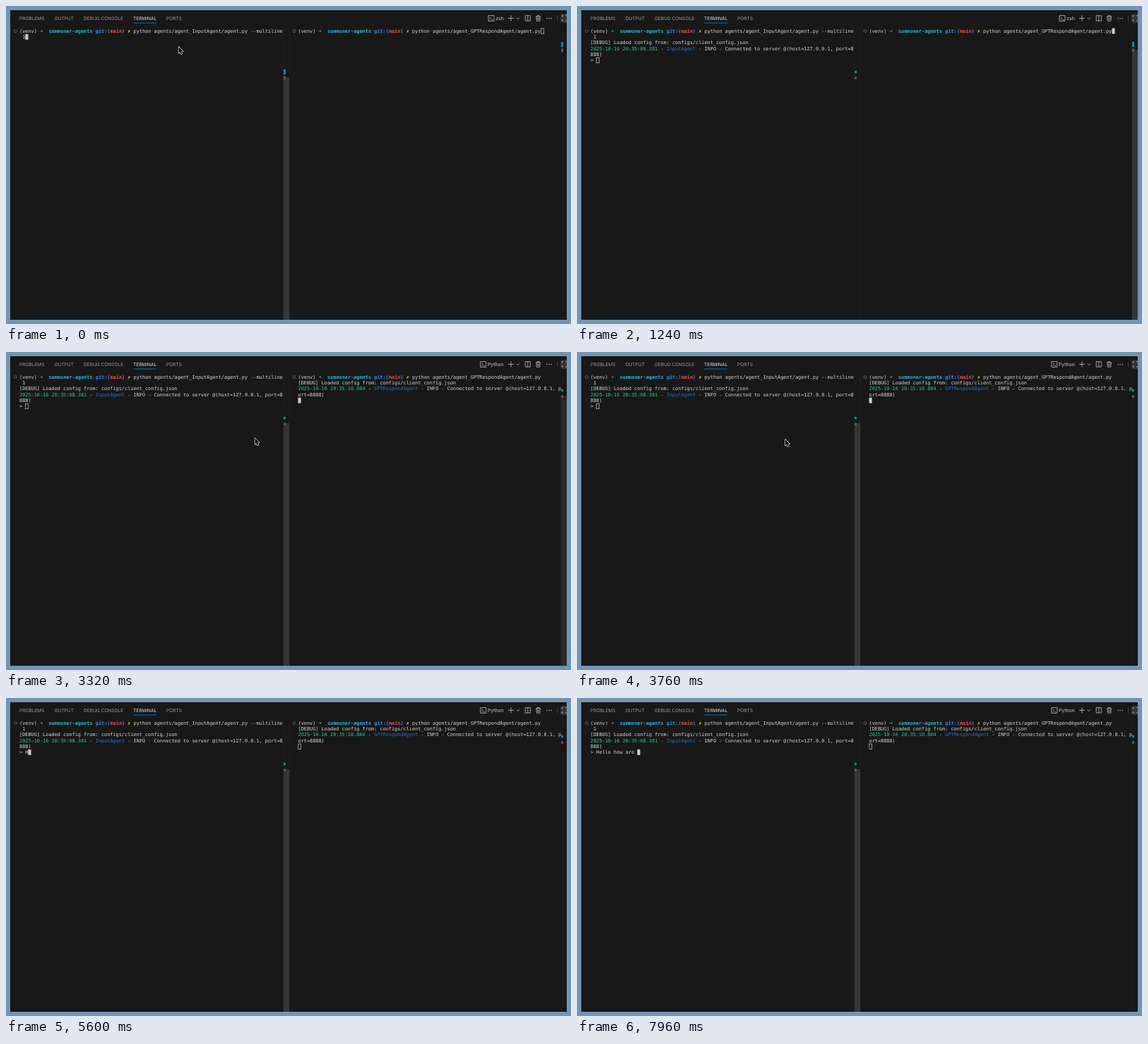
An HTML page with a canvas for the animation above (8000 ms loop, 800 by 451 pixels).

```html
<!DOCTYPE html>
<html lang="en">
<head>
<meta charset="utf-8">
<title>Terminal</title>
<style>
html, body { margin: 0; width: 100%; height: 100%; overflow: hidden; background: #7295b4; }
canvas { display: block; }
</style>
</head>
<body>
<canvas id="stage" width="800" height="451"></canvas>
<script>
const ctx = document.getElementById('stage').getContext('2d');
const LOOP = 8000, SIZE = 6.88, CELL = 4.144, ROW = 8.28, TOP = 31.4;
const MONO = `${SIZE}px "DejaVu Sans Mono", monospace`;
const SANS = 'Inter, sans-serif';
const WHITE = '#d6d6d6', GREEN = '#23d18b', CYAN = '#29b8db', BLUE = '#3b8eea', AGENT = '#2472c8';

// Moments of the session, in ms
const LEFT_RUN = 120, LEFT_LOG = 480, RIGHT_FOCUS = 880, RIGHT_RUN = 1520, RIGHT_LOG = 2880, LEFT_FOCUS = 4280;
const MESSAGE = 'Hello how are ';
const KEY_TIMES = [5500, 5640, 5800, 5960, 6120, 6280, 6600, 6720, 6840, 6960, 7160, 7320, 7480, 7640];

// Each path: shown from, shown until, then points [time, x, y]
const POINTER_PATHS = [
  [0, 1080, [[160, 244.5, 57.5], [860, 560, 98]]],
  [2920, 5480, [[2920, 560, 98], [3480, 302, 127.5], [3760, 295, 123.5], [4280, 110.5, 86]]],
];

const clamp = v => Math.max(0, Math.min(1, v));
const ramp = (t, start, length) => clamp((t - start) / length);
const smooth = v => v * v * (3 - 2 * v);

function rect(x, y, w, h, color) {
  ctx.fillStyle = color;
  ctx.fillRect(x, y, w, h);
}

function stroke(path, color = '#cccccc', width = 0.75) {
  ctx.strokeStyle = color;
  ctx.lineWidth = width;
  ctx.stroke(new Path2D(path));
}

function label(text, x, color, size, align = 'left') {
  ctx.font = `${size}px ${SANS}`;
  ctx.textAlign = align;
  ctx.fillStyle = color;
  ctx.fillText(text, x, 20);
  ctx.textAlign = 'left';
}

function write(x, col, row, text, color = WHITE, bold = false) {
  ctx.font = (bold ? 'bold ' : '') + MONO;
  ctx.fillStyle = color;
  ctx.fillText(text, x + col * CELL, TOP + row * ROW + 6.4);
}

function cursor(x, col, row, focused) {
  const left = x + col * CELL, top = TOP + row * ROW;
  if (focused) return rect(left, top + 0.2, CELL, ROW - 0.4, '#cccccc');
  ctx.strokeStyle = '#cccccc';
  ctx.lineWidth = 0.7;
  ctx.strokeRect(left + 0.35, top + 0.5, CELL - 0.5, ROW - 0.9);
}

function prompt(x, command) {
  ctx.beginPath();
  ctx.arc(x - 5.5, 35.6, 1.9, 0, 7);
  ctx.strokeStyle = '#777777';
  ctx.lineWidth = 0.7;
  ctx.stroke();
  write(x, 0, 0, '(venv)');
  write(x, 7, 0, '➜', GREEN, true);
  write(x, 10, 0, 'summoner-agents', CYAN, true);
  write(x, 26, 0, 'git:(', BLUE, true);
  write(x, 31, 0, 'main', '#f14c4c', true);
  write(x, 35, 0, ')', BLUE, true);
  write(x, 37, 0, '✗', '#f5f543', true);
  write(x, 39, 0, command);
}

function log(x, row, time, agent, tail, wrapped) {
  write(x, 0, row, '[DEBUG] Loaded config from: configs/client_config.json');
  write(x, 0, row + 1, '2025-10-16 ' + time, GREEN);
  write(x, 24, row + 1, '-');
  write(x, 26, row + 1, agent, AGENT);
  write(x, 27 + agent.length, row + 1, '- INFO - Connected to server @(host=127.0.0.1, ' + tail);
  write(x, 0, row + 2, wrapped);
}

function scrollbar(x, y, alpha) {
  ctx.globalAlpha = alpha;
  rect(x, y, 8, 445 - y, '#363636');
  ctx.globalAlpha = 1;
}

function marks(x, y, running) {
  const h = running ? 3.4 : 7.4;
  rect(x, y - h / 2, 3, h, '#1b81a8');
  rect(x, y + 7.6 - h / 4, 3, running ? 3.4 : 5, '#5a5a5a');
}

function header(shell) {
  const tabs = [['PROBLEMS', 19], ['OUTPUT', 68.5], ['DEBUG CONSOLE', 110], ['TERMINAL', 180], ['PORTS', 227]];
  for (const [name, x] of tabs) label(name, x, name === 'TERMINAL' ? '#e0e0e0' : '#9d9d9d', 6.55);
  rect(180, 23.6, 33, 0.9, '#0078d4');

  label(shell, 704.8, '#cccccc', 6.9, 'right');
  const x = shell === 'zsh' ? 683 : 671.8;
  stroke(`M${x} 13.6h8v7.8h-8zM${x + 1.6} 15.6l2 1.9l-2 1.9M${x + 4} 19.6h2.4`);
  stroke('M711 17.4h8M715 13.4v8M722.8 16.5l2.1 2.1l2.1-2.1');
  stroke('M735.2 13.7h7.2v7.4h-7.2zM738.8 13.7v7.4');
  stroke('M750 15h7.2M752.2 15v-1.4h2.8v1.4M750.9 15l.4 6.2h4.6l.4-6.2M752.7 16.6v3.2M754.5 16.6v3.2');
  for (const dot of [765.6, 768.6, 771.6]) rect(dot, 16.9, 1.2, 1.2, '#cccccc');
  rect(780.3, 13.5, 0.7, 8, '#555555');
  ctx.fillStyle = '#343536';
  ctx.beginPath();
  ctx.roundRect(785, 11, 14, 13, 3);
  ctx.fill();
  stroke('M789 13.7h-1.6v2M787.4 19v2h1.6M792 13.7h2M792 21h2');
}

function pointer(t) {
  const path = POINTER_PATHS.find(([from, until]) => t >= from && t < until);
  if (!path) return;
  const points = path[2];
  let [, x, y] = points[0];
  for (let i = 1; i < points.length; i++) {
    const [t0, x0, y0] = points[i - 1], [t1, x1, y1] = points[i];
    if (t < t0) break;
    const k = smooth(ramp(t, t0, t1 - t0));
    x = x0 + (x1 - x0) * k;
    y = y0 + (y1 - y0) * k;
  }
  const arrow = new Path2D('M0 0V8.9L2 7.1L3.4 10.3L4.9 9.6L3.5 6.5H6.2Z');
  ctx.save();
  ctx.translate(x, y + 0.4);
  ctx.lineJoin = 'round';
  ctx.strokeStyle = '#ffffff';
  ctx.lineWidth = 1.3;
  ctx.stroke(arrow);
  ctx.fillStyle = '#000000';
  ctx.fill(arrow);
  ctx.restore();
}

function leftPane(t, focused) {
  const x = 19;
  prompt(x, 'python agents/agent_InputAgent/agent.py --multiline');
  write(x, 1, 1, '1');
  if (t < LEFT_RUN) return cursor(x, 2, 1, focused);
  if (t < LEFT_LOG) return cursor(x, 0, 2, focused);
  log(x, 2, '20:35:08.381', 'InputAgent', 'port=8', '888)');
  const typed = KEY_TIMES.filter(time => t >= time).length;
  write(x, 0, 5, '> ' + MESSAGE.slice(0, typed));
  cursor(x, 2 + typed, 5, focused);
}

function rightPane(t, focused) {
  const x = 413.5;
  prompt(x, 'python agents/agent_GPTRespondAgent/agent.py');
  if (t < RIGHT_RUN) return cursor(x, 83, 0, focused);
  if (t < RIGHT_LOG) return cursor(x, 0, 1, focused);
  log(x, 1, '20:35:10.804', 'GPTRespondAgent', 'p', 'ort=8888)');
  cursor(x, 0, 4, focused);
}

function draw(t) {
  ctx.textRendering = 'geometricPrecision';
  rect(0, 0, 800, 451, '#7295b4');
  ctx.save();
  ctx.beginPath();
  ctx.rect(6, 6, 788, 439);
  ctx.clip();
  rect(6, 6, 788, 439, '#181818');
  for (const x of [392.6, 400.8, 785.8]) rect(x, 30, 0.6, 415, '#242424');

  const rightFocused = t >= RIGHT_FOCUS && t < LEFT_FOCUS;
  const running = rightFocused ? t >= RIGHT_RUN : t >= LEFT_RUN;
  header(running ? 'Python' : 'zsh');

  scrollbar(393, 101, t < 2000 ? 1 - ramp(t, 420, 800) : ramp(t, 3200, 100));
  scrollbar(786, 62, t < 2000 ? ramp(t, 500, 100) : 1 - ramp(t, 3060, 700));
  marks(393, 93.6, t >= LEFT_RUN);
  marks(786, 54.6, t >= RIGHT_RUN);

  leftPane(t, !rightFocused);
  rightPane(t, rightFocused);
  pointer(t);
  ctx.restore();
}

function tick() {
  draw(performance.now() % LOOP);
  requestAnimationFrame(tick);
}
tick();
</script>
</body>
</html>
```
